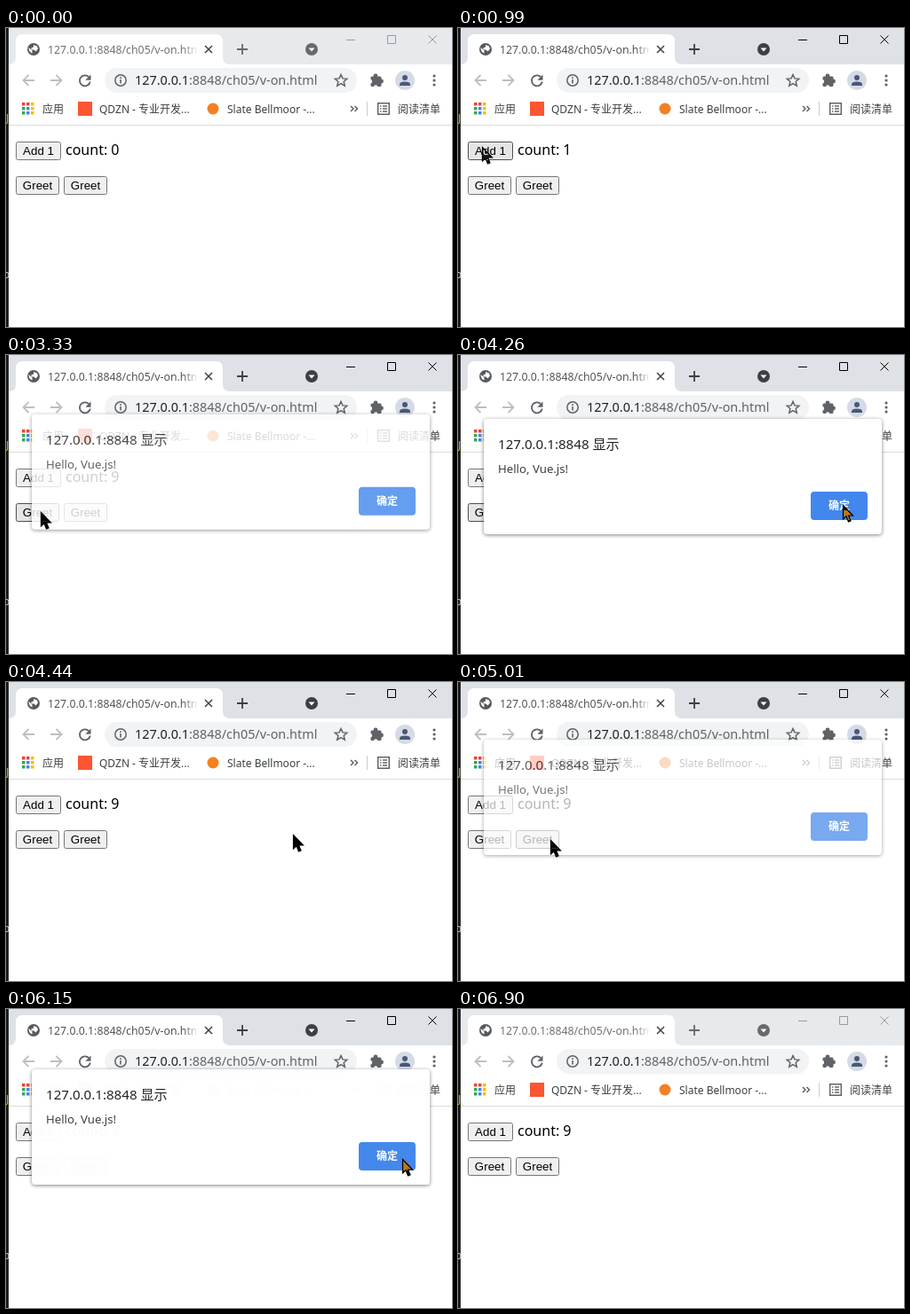
These frames come from a looping animation (502x337 px, 6960 ms). An HTML page:

```html
<!DOCTYPE html>
<html lang="zh">
<head>
<meta charset="utf-8">
<title>v-on</title>
<style>
  html, body { margin: 0; width: 100%; height: 100%; overflow: hidden; background: #fff; }
  svg { display: block; }
  text { font: 12px "Noto Sans", "Noto Sans CJK SC", sans-serif; fill: #3c4043; white-space: pre; }
  .icon { fill: #5f6368; }
  .line { fill: none; stroke: #5f6368; stroke-width: 1.5; }
  .url { font-size: 14.4px; fill: #5f6368; }
  #strip { fill: #e7eaed; }
  #tabTitle { font-size: 12.3px; fill: #6f7276; }
  #controls { fill: none; stroke: #999; }
  #tabTools { opacity: .75; }
  .active #strip { fill: #dee1e6; }
  .active #tabTitle { fill: #505458; }
  .active #controls { stroke: #000; }
  .active #tabTools { opacity: 1; }
  .button rect { fill: #efefef; stroke: #767676; }
  .button text { font: 13.333px "Liberation Sans", Arial, sans-serif; fill: #000; text-anchor: middle; }
  .hover rect { fill: #e5e5e5; stroke: #4f4f4f; }
  .pressed rect { fill: #f5f5f5; stroke: #8d8d8d; }
  #count { font-size: 16px; fill: #000; }
  #panel { filter: drop-shadow(0 1px 2px rgba(0, 0, 0, .5)); }
  .fill { fill: #fff; mix-blend-mode: difference; }
  .edge { fill: none; stroke: #000; stroke-width: 1.2; }
</style>
</head>
<body>
<svg id="stage" width="502" height="337" viewBox="0 0 502 337">
  <defs>
    <linearGradient id="fade">
      <stop offset="0" stop-color="#fff" stop-opacity="0"/>
      <stop offset="1" stop-color="#fff"/>
    </linearGradient>
  </defs>

  <!-- editor behind the window -->
  <rect width="4" height="337" fill="#1e1e1e"/>
  <text x="0" y="106" style="fill:#d8c04a">J</text>
  <text x="-3" y="282" style="fill:#ccc">o</text>
  <rect x="3" width="499" height="337" fill="#fff"/>

  <!-- tab strip -->
  <rect id="strip" x="3" width="499" height="41"/>
  <path d="M3 41Q11 41 11 33V15Q11 7 19 7H236Q244 7 244 15V33Q244 41 252 41Z" fill="#fff"/>
  <circle cx="31" cy="24" r="7" fill="#565a5f"/>
  <path d="M25.500 22l4 3.500v3q-4-1.500-4-6.500zM31 19l4 1.500 1 3-2.500 3-2-2h-3v-2l2.500-1z" fill="#fff"/>
  <text id="tabTitle" x="47" y="28.5">127.0.0.1:8848/ch05/v-on.html</text>
  <rect x="200" y="12" width="16" height="24" fill="url(#fade)"/>
  <rect x="216" y="12" width="20" height="24" fill="#fff"/>
  <path class="line" style="stroke:#3c4043" d="M224 20l8 8m0-8l-8 8"/>
  <g id="tabTools">
    <path class="line" style="stroke:#3c4043;stroke-width:1.8" d="M260 24h12m-6-6v12"/>
    <circle cx="344" cy="24" r="7" fill="#3c4043"/>
    <path d="M340.5 22.5h7l-3.5 4z" fill="#fff"/>
  </g>
  <path id="controls" d="M383 13.5h10M429.5 8.5h9v9h-9zM475.5 8.5l9 9m0-9l-9 9"/>

  <!-- toolbar -->
  <path class="line" style="stroke:#bdbfc1;stroke-width:1.8" d="M32 59H19.5m6-6l-6 6 6 6M50 59h12.5m-6-6l6 6-6 6"/>
  <path class="line" style="stroke-width:1.8" d="M93.3 55.2A6 6 0 1 0 94.8 60.5"/>
  <path class="icon" d="M95.5 52.5v6.2h-6.2z"/>
  <rect x="111" y="45" width="284" height="28" rx="14" fill="#f1f3f4"/>
  <circle class="line" cx="129" cy="59" r="6.2"/>
  <path class="icon" d="M128.2 58h1.6v4.5h-1.6zM128.2 55.3h1.6v1.6h-1.6z"/>
  <text class="url" x="145" y="64"><tspan fill="#202124">127.0.0.1</tspan>:8848/ch05/v-on.html</text>
  <path class="line" d="M377 52.5l2 4.4 4.8.4-3.6 3.2 1.1 4.7-4.3-2.5-4.2 2.5 1.1-4.7-3.6-3.2 4.8-.4z"/>
  <g class="icon">
    <rect x="410.5" y="54.5" width="12" height="11.5" rx="1.5"/>
    <circle cx="416" cy="54" r="2.4"/>
    <circle cx="422.5" cy="60" r="2.4"/>
  </g>
  <path d="M410 58a2.2 2.2 0 0 1 0 4.4zM414 66.5a2.2 2.2 0 0 1 4.4 0z" fill="#fff"/>
  <circle cx="449" cy="59" r="11" fill="#d5dbe6"/>
  <g fill="#4a5878">
    <circle cx="449" cy="56" r="3"/>
    <path d="M443 65v-1.5q0-3 6-3t6 3V65z"/>
  </g>
  <g class="icon">
    <circle cx="482" cy="54" r="1.6"/><circle cx="482" cy="59" r="1.6"/><circle cx="482" cy="64" r="1.6"/>
  </g>

  <!-- bookmarks -->
  <g id="apps"></g>
  <text x="41" y="95.5">应用</text>
  <rect x="81" y="83" width="16" height="16" fill="#fc5531"/>
  <text x="105" y="95.5">QDZN - 专业开发...</text>
  <circle cx="233" cy="91" r="6.5" fill="#f48024"/>
  <text x="249" y="95.5">Slate Bellmoor -...</text>
  <path class="line" d="M388 88l3 3-3 3m4.5-6l3 3-3 3"/>
  <path d="M406.5 83v16" stroke="#ccc"/>
  <path class="line" d="M418.7 84.7h12.6v12.6h-12.6zM421 88h1.5m1.5 0h5M421 91h1.5m1.5 0h5M421 94h1.5m1.5 0h5"/>
  <text x="441" y="95.5">阅读清单</text>
  <path d="M3 109.5H502" stroke="#dadce0"/>

  <!-- page -->
  <g id="buttons"></g>
  <text id="count" x="67" y="143"></text>

  <g id="dialog">
    <rect id="panel" x="29" y="72" width="448" height="130" rx="4" fill="#fff"/>
    <text x="45" y="106" style="font-size:15.1px;fill:#202124">127.0.0.1:8848 显示</text>
    <text x="45" y="133" style="font-size:13.2px">Hello, Vue.js!</text>
    <rect x="397" y="154" width="64" height="32" rx="4" fill="#4287ec"/>
    <text x="429" y="174.5" text-anchor="middle" style="fill:#fff;font-weight:bold">确定</text>
  </g>

  <path class="cursor fill" d="M.5 .5V16L4 12.8 6.5 19 9 18 6.5 12H11.5Z"/>
  <path class="cursor edge" d="M.5 .5V16L4 12.8 6.5 19 9 18 6.5 12H11.5Z"/>
</svg>

<script>
const LOOP = 6960;
const $ = id => document.getElementById(id);

// Pointer stops: time, x, y
const stops = [
  [360, 466, 61], [660, 1, 170], [780, 27, 134],
  [2730, 27, 134], [2910, 39, 177],
  [3450, 39, 177], [3690, 484, 155], [3900, 433, 169],
  [4290, 433, 169], [4680, 104, 178],
  [5160, 104, 178], [5520, 463, 157], [5640, 449, 167],
  [6060, 449, 167], [6150, 446, 169],
  [6210, 446, 169], [6570, 502, 150]
];
// Mouse down and up times on the page buttons
const addClicks = [
  [930, 990], [1410, 1480], [1550, 1620], [1690, 1760], [1830, 1980],
  [2050, 2120], [2195, 2265], [2335, 2405], [2480, 2550]
];
const clicks = [...addClicks, [3060, 3150], [4860, 4905]];
const dialogs = [{ open: 3210, close: 4260 }, { open: 4910, close: 6105 }];
const SLIDE_MS = 180, SLIDE_PX = 16;

const clamp = v => Math.min(1, Math.max(0, v));

const buttons = [[11, 128, 51, "Add 1"], [11, 167, 49, "Greet"], [65, 167, 49, "Greet"]]
  .map(([x, y, w, label]) => {
    $("buttons").insertAdjacentHTML("beforeend",
      `<g class="button"><rect x="${x + .5}" y="${y + .5}" width="${w - 1}" height="20" rx="2"/>
       <text x="${x + w / 2}" y="${y + 15}">${label}</text></g>`);
    return { x, y, w, node: $("buttons").lastElementChild };
  });

const appColors = ["#ea4335", "#ea4335", "#fbbc05", "#34a853", "#4285f4", "#fbbc05", "#34a853", "#4285f4", "#fbbc05"];
$("apps").innerHTML = appColors.map((color, i) =>
  `<rect x="${18 + i % 3 * 5}" y="${84 + Math.floor(i / 3) * 5}" width="3.5" height="3.5" fill="${color}"/>`).join("");

function pointerAt(t) {
  const i = stops.findIndex(s => s[0] > t);
  if (i < 1) return null;
  const [t0, x0, y0] = stops[i - 1], [t1, x1, y1] = stops[i];
  const p = (t - t0) / (t1 - t0), k = p * p * (3 - 2 * p);
  return { x: x0 + (x1 - x0) * k, y: y0 + (y1 - y0) * k };
}

function draw(t) {
  $("stage").classList.toggle("active", t >= 930 && t < 6900);
  $("count").textContent = "count: " + addClicks.filter(c => t >= c[1]).length;

  const dialog = dialogs.find(d => t >= d.open && t < d.close + SLIDE_MS);
  let lift = 1, alpha = 0;
  if (dialog) {
    const closing = t >= dialog.close;
    lift = closing ? clamp((t - dialog.close) / SLIDE_MS) : 1 - clamp((t - dialog.open) / SLIDE_MS);
    alpha = 1 - lift ** (closing ? 3 : 1.5);
  }
  $("dialog").setAttribute("transform", `translate(0 ${-SLIDE_PX * lift})`);
  $("dialog").setAttribute("opacity", alpha);

  const pointer = pointerAt(t);
  for (const node of document.querySelectorAll(".cursor")) {
    node.style.display = pointer ? "" : "none";
    if (pointer) node.setAttribute("transform", `translate(${Math.round(pointer.x)} ${Math.round(pointer.y)})`);
  }

  // The page keeps its hover state while the dialog blocks it
  const target = pointerAt(dialog ? dialog.open : t);
  const down = clicks.some(c => t >= c[0] && t < c[1]);
  for (const { x, y, w, node } of buttons) {
    const over = !!target && target.x >= x && target.x < x + w && target.y >= y && target.y < y + 21;
    node.classList.toggle("hover", over);
    node.classList.toggle("pressed", over && down);
  }
}

function tick() {
  draw(performance.now() % LOOP);
  requestAnimationFrame(tick);
}
tick();
</script>
</body>
</html>
```
